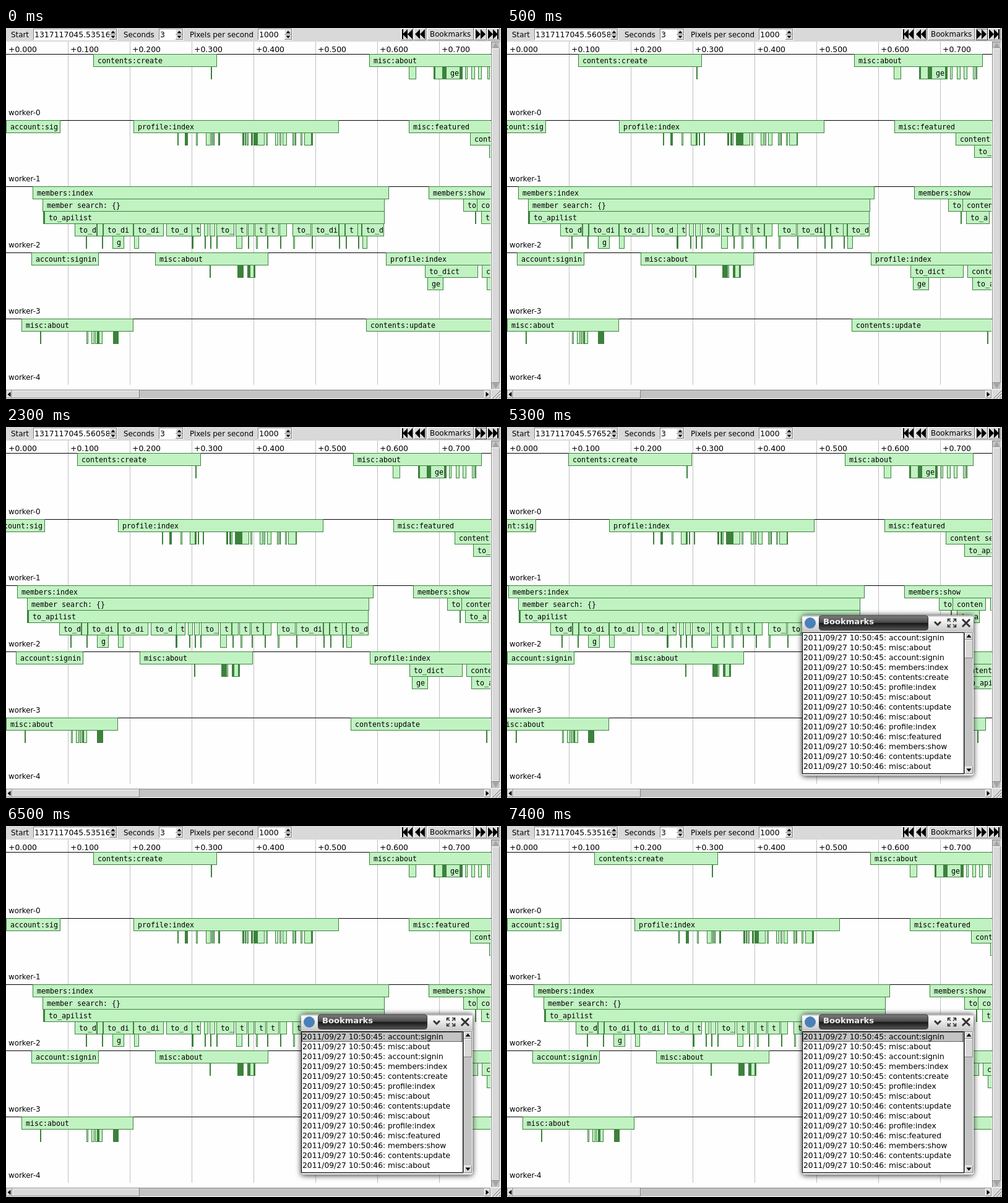
Recreate the animation shown at these times as an HTML page. Size 800 by 600 pixels, loop 8 s.

```html
<!DOCTYPE html>
<html lang="en">
<head>
<meta charset="utf-8">
<title>Worker timeline</title>
<style>
  html, body { margin: 0; width: 100%; height: 100%; overflow: hidden; background: #d9d9d9; }
  svg { display: block; }
  text { font: 11.85px "DejaVu Sans", sans-serif; white-space: pre; }
  .num { font-size: 12.45px; }
  .list { font-size: 12.3px; }
  .title { font-size: 13.1px; font-weight: bold; fill: #eee; }
  .mono { font: 11.63px "DejaVu Sans Mono", monospace; }
  rect, line { shape-rendering: crispEdges; }
  .bar { fill: #c1f2c2; stroke: #3d813d; }
  .solid { fill: #3d813d; stroke: #3d813d; }
  .smooth { shape-rendering: auto; }
  #frame { filter: drop-shadow(0 1px 5px rgba(0, 0, 0, .85)); }
</style>
</head>
<body>
<svg id="stage" width="800" height="600" viewBox="0 0 800 600"></svg>
<script>
const LOOP = 8000;
// start ms, scroll in px, forward button focused, bookmark window open, first entry selected
const STEPS = [
  [0, 0, false, false, false],
  [500, 25.42, true, false, false],
  [3500, 41.36, false, true, false],
  [6500, 0, false, true, true],
];

// spans: [level, from, to, label]; thin and solid: level -> from, to pairs
const WORKERS = [
  {
    spans: [[0, 141.2, 340.2, 'contents:create'], [0, 587.4, 794.4, 'misc:about'], [1, 711.6, 733.6, 'ge']],
    thin: { 1: [331.6, 332.6, 651, 662, 693.6, 705.6, 742.4, 745.4, 752.6, 757.6, 763.6, 768.6, 778.5, 781.5, 784, 785] },
    solid: { 1: [691.6, 693.6, 705.6, 711.6, 733.6, 737] },
  },
  {
    spans: [[0, .5, 87.6, 'account:signin'], [0, 206.5, 537.6, 'profile:index'], [0, 651.6, 900, 'misc:featured'],
      [1, 750.5, 880, 'content search'], [2, 781, 880, 'to_apilist']],
    thin: { 1: [277.6, 278.6, 307.5, 309.5, 323, 330.6, 332, 333, 335.6, 336.6, 386.5, 387.5, 389, 391,
      406.5, 417.6, 420.5, 422.5, 435.6, 439.6, 442, 444, 447.6, 453.6, 463.5, 465.5, 467.9, 468.9,
      476.5, 478.5, 482, 493.5] },
    solid: { 1: [289.5, 293, 343.5, 345, 382, 384, 396, 398.5, 400, 406.5, 493.5, 495] },
  },
  {
    spans: [[0, 43.6, 618.6, 'members:index'], [0, 683.5, 880, 'members:show'],
      [1, 59.6, 611.6, 'member search: {}'], [1, 739.4, 761.5, 'to_dict'], [1, 761.5, 814.8, 'content search'],
      [1, 823, 880], [2, 62.4, 611.4, 'to_apilist'], [2, 768.4, 804.5, 'to_apilist'],
      ...[[111, 146], [157, 205], [206, 254], [259, 300], [300, 314], [340, 368], [371, 389], [402, 419],
        [421, 440], [463, 492], [494, 537], [548, 568], [575, 610]]
        .map(([a, b]) => [3, a + .5, b + .5, 'to_dict']),
      [4, 172.6, 190.6, 'get']],
    thin: {
      2: [60.4, 61.4, 758.5, 759.5],
      3: [147.5, 156.5, 320, 326.5, 329.5, 337.5, 391, 400.5, 442, 453.5, 538.5, 547.5, 568.5, 574.5],
      4: [129.6, 130.6, 155.5, 156.5, 207, 214.5, 321.6, 322.6, 330.5, 331.5, 340, 341, 372, 381.5, 391.6, 392.6,
        404.6, 406.6, 422.5, 423.5, 443.5, 444.5, 464.6, 466.6, 494.6, 495.6, 538.5, 539.5, 549.5, 550.5,
        569.5, 570.5, 576, 583.5],
    },
    solid: { 4: [300, 302] },
  },
  {
    spans: [[0, 41.5, 149.5, 'account:signin'], [0, 241.5, 423.6, 'misc:about'], [0, 614.2, 900, 'profile:index'],
      [1, 677.7, 762.7, 'to_dict'], [1, 769.6, 880, 'content search'],
      [2, 681.5, 706.7, 'get'], [2, 777.6, 880, 'to_apilist']],
    thin: { 1: [329.6, 330.6, 382, 383.5, 394, 400.5, 401.5, 402.5] },
    solid: { 1: [374, 381.6, 390.6, 394] },
  },
  {
    spans: [[0, 25.6, 205.8, 'misc:about'], [0, 582.7, 814.7, 'contents:update']],
    thin: { 1: [55.6, 56.6, 130.6, 132.6, 138.6, 142.6, 144.5, 147, 148.6, 149.6, 150.5, 155.6, 801.7, 802.7] },
    solid: { 1: [173, 181.6] },
  },
];

const BOOKMARKS = ['45: account:signin', '45: misc:about', '45: account:signin', '45: members:index',
  '45: contents:create', '45: profile:index', '45: misc:about', '46: contents:update', '46: misc:about',
  '46: profile:index', '46: misc:featured', '46: members:show', '46: contents:update', '46: misc:about'];

const range = n => [...Array(n).keys()];
const text = (x, y, s, cls = '') => `<text x="${x}" y="${y}" class="${cls}">${s}</text>`;
const rect = (x, y, w, h, fill, more = '') =>
  `<rect x="${x}" y="${y}" width="${w}" height="${h}" fill="${fill}" ${more}/>`;
const path = (d, fill = '#000', more = '') => `<path d="${d}" fill="${fill}" ${more}/>`;
const bevel = (x, y, w, h, fill = '#d9d9d9', lit = '#fff', dark = '#828282') =>
  rect(x, y, w, h, dark) + rect(x, y, w - 1, h - 1, lit) + rect(x + 1, y + 1, w - 2, h - 2, fill);

// triangle centred on (x, y): dx, dy is the way it points, r half its base
function arrow(x, y, dx, dy, r, len, fill) {
  const bx = x - dx * len / 2, by = y - dy * len / 2;
  return path(`M${x + dx * len / 2} ${y + dy * len / 2}L${bx - dy * r} ${by - dx * r}L${bx + dy * r} ${by + dx * r}Z`, fill);
}

function spinbox(x, w) {
  const b = x + w - 13;
  return bevel(x, 1, w, 19, '#fff', '#828282', '#fff') +
    bevel(b, 2, 12, 9) + bevel(b, 11, 12, 8) +
    arrow(b + 6, 6.5, 0, -1, 3.5, 4) + arrow(b + 6, 14.5, 0, 1, 3.5, 4);
}

function navButton(x, dir, end) {
  const c = x + 10;
  return bevel(x, 0, 20, 20) +
    [-4, 4].map(d => arrow(c + d + (end ? -dir : 0), 10, dir, 0, 8, 8)).join('') +
    (end ? rect(dir > 0 ? c + 6 : c - 8, 2, 2, 16, '#000') : '');
}

const toolbar = () => rect(0, 0, 800, 600, '#d9d9d9') +
  text(8, 15, 'Start') + spinbox(44, 136) +
  text(190, 15, 'Seconds') + spinbox(247, 40) + text(249, 15, '3', 'num') +
  text(297, 15, 'Pixels per second') + spinbox(407, 56) + text(409, 15, '1000', 'num') +
  navButton(638, -1, true) + navButton(659, -1) +
  bevel(681, 0, 75, 20) + text(685, 14, 'Bookmarks') +
  navButton(757, 1) + navButton(778, 1, true);

const scrollbars = () => bevel(784, 22, 15, 563, '#c3c3c3', '#828282', '#fff') +
  arrow(791.5, 28, 0, -1, 5, 9, '#a3a3a3') + bevel(785, 33, 13, 541) +
  arrow(791.5, 579, 0, 1, 5, 9, '#a3a3a3') +
  bevel(0, 585, 784, 15, '#c3c3c3', '#828282', '#fff') +
  bevel(1, 586, 9, 13) + arrow(5, 592.5, -1, 0, 4, 5) + bevel(10, 586, 206, 13) +
  bevel(773, 586, 10, 13) + arrow(778, 592.5, 1, 0, 4, 5) +
  [0, 5, 10].map(d => path(`M${786 + d} 599L799 ${586 + d}`, 'none', 'stroke="#828282" stroke-width="1.5"') +
    path(`M${785 + d} 599L799 ${585 + d}`, 'none', 'stroke="#fff"')).join('');

const backdrop = () => rect(0, 22, 784, 563, '#fefefe') +
  range(7).map(i => rect(100 * i + 100, 22, 1, 555, '#c0c0c0')).join('') +
  range(8).map(i => text(100 * i + 4, 39, `+0.${i}00`, 'num')).join('') +
  range(5).map(i => rect(0, 42 + 107 * i, 784, 1, '#000') + text(4, 141 + 107 * i, `worker-${i}`)).join('');

function bars(scroll) {
  const at = x => Math.floor(x - scroll);
  const box = (top, level, from, to, cls) =>
    `<rect class="${cls}" x="${at(from) + .5}" y="${top + 20 * level + .5}" width="${at(to) - at(from)}" height="20"/>`;
  const pairs = (top, lists, cls) => Object.entries(lists).map(([level, xs]) =>
    range(xs.length / 2).map(i => box(top, level, xs[2 * i], xs[2 * i + 1], cls)).join('')).join('');

  return WORKERS.map(({ spans, thin, solid }, i) => {
    const top = 42 + 107 * i;
    return spans.map(([level, from, to, label = '']) => box(top, level, from, to, 'bar') +
      text(at(from) + 7, top + 20 * level + 15, label.slice(0, Math.floor((to - from - 7) / 7)), 'mono')).join('') +
      pairs(top, thin, 'bar') + pairs(top, solid, 'solid');
  }).join('');
}

const bookmarkWindow = () => `
  <g id="frame"><rect class="smooth" x="477" y="304" width="277" height="260" rx="4" fill="url(#silver)"/></g>
  <circle cx="490" cy="317" r="9" fill="#4a80b8"/>
  <rect class="smooth" x="504.5" y="305" width="176" height="23.5" rx="4" fill="url(#pill)" stroke="#333"/>` +
  text(511, 319, 'Bookmarks', 'title') +
  path('M691 315L696 320L701 315', 'none', 'stroke="#333" stroke-width="3"') +
  path('M712.5 315V310.500H717M721 310.500H725.500V315M725.500 319V323.500H721M717 323.500H712.500V319' +
    'M713 311L717 315M725 311L721 315M713 323L717 319M725 323L721 319', 'none', 'stroke="#333" stroke-width="1.6"') +
  path('M736 311L748 323M748 311L736 323', 'none', 'stroke="#333" stroke-width="3"') +
  rect(477, 331, 277, 231, '#d9d9d9') + rect(477, 332, 262, 229, '#000') + rect(478, 333, 260, 227, '#fff') +
  `<g id="pick">${rect(478, 333, 260, 16, '#c3c3c3')}
    <rect x="478.5" y="333.5" width="258" height="15" fill="none" stroke="#000" stroke-dasharray="1 1"/></g>` +
  BOOKMARKS.map((s, i) => text(479, 345 + 16 * i, '2011/09/27 10:50:' + s, 'list')).join('') +
  bevel(739, 332, 15, 230, '#c3c3c3', '#828282', '#fff') +
  bevel(740, 333, 13, 11) + arrow(746.5, 338, 0, -1, 4, 5) + bevel(740, 344, 13, 30) +
  bevel(740, 549, 13, 12) + arrow(746.5, 555, 0, 1, 4, 5);

document.getElementById('stage').innerHTML = `
  <defs>
    <linearGradient id="silver" x2="0" y2="1">
      <stop stop-color="#999"/><stop offset=".015" stop-color="#fff"/>
      <stop offset=".1" stop-color="#c9c9c9"/><stop offset="1" stop-color="#d9d9d9"/>
    </linearGradient>
    <linearGradient id="pill" x2="0" y2="1">
      <stop stop-color="#808080"/><stop offset=".48" stop-color="#484848"/>
      <stop offset=".52" stop-color="#181818"/><stop offset="1" stop-color="#555"/>
    </linearGradient>
    <clipPath id="view"><rect x="0" y="22" width="783" height="563"/></clipPath>
    <clipPath id="field"><rect x="45" y="2" width="122" height="17"/></clipPath>
  </defs>
  ${toolbar()}
  <g clip-path="url(#field)"><text id="start" class="num" x="46" y="15"></text></g>
  <rect id="focus" x="758.5" y="1.5" width="18" height="18" fill="none" stroke="#000" stroke-dasharray="1 1"/>
  ${backdrop()}
  <g id="bars" clip-path="url(#view)"></g>
  ${scrollbars()}
  <g id="bookmarks">${bookmarkWindow()}</g>`;

const el = id => document.getElementById(id);
const show = (id, on) => el(id).setAttribute('visibility', on ? 'visible' : 'hidden');
const begin = performance.now();
let current;

function tick() {
  const t = (performance.now() - begin) % LOOP;
  const step = STEPS.findLast(s => s[0] <= t);
  if (step !== current) {
    current = step;
    const [, scroll, focus, open, picked] = step;
    el('bars').innerHTML = bars(scroll);
    el('start').textContent = (1317117045.53516 + scroll / 1000).toFixed(5);
    show('focus', focus);
    show('bookmarks', open);
    show('pick', open && picked);
  }
  requestAnimationFrame(tick);
}
tick();
</script>
</body>
</html>
```
